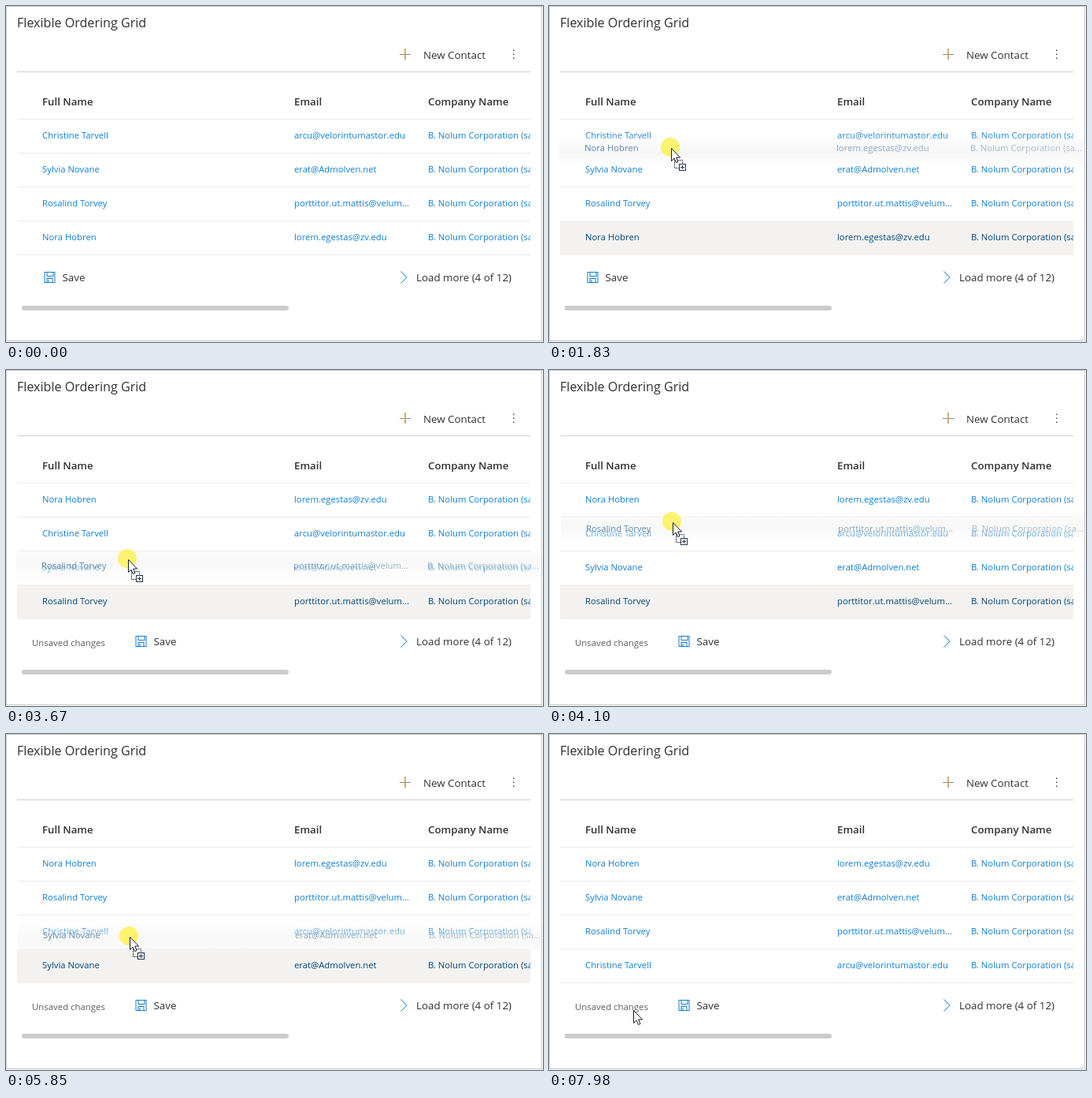
These frames come from a looping animation (682x426 px, 8000 ms). An HTML page with a canvas:

```html
<!DOCTYPE html>
<html lang="en">
<head>
<meta charset="utf-8">
<title>Flexible Ordering Grid</title>
<style>
  html, body { margin: 0; width: 100%; height: 100%; overflow: hidden; background: #fff; }
  canvas { display: block; width: 682px; height: 426px; }
</style>
</head>
<body>
<canvas id="stage"></canvas>
<script>
const W = 682, H = 426, LOOP = 8000;
const FONT = '"Open Sans", "Noto Sans", sans-serif';
const BLUE = '#0f7fd6', DARK_BLUE = '#004578', INK = '#323130';
const LEFT = 14, WIDTH = 652, ROW_TOP = 143, ROW_H = 43;
const COLS = [46, 366, 536];
const BODY = 11.3, LABEL = 13.35;
const COMPANY = 'B. Nolum Corporation (sa';

const people = [
  ['Christine Tarvell', 'arcu@velorintumastor.edu'],
  ['Sylvia Novane', 'erat@Admolven.net'],
  ['Rosalind Torvey', 'porttitor.ut.mattis@velum...'],
  ['Nora Hobren', 'lorem.egestas@zv.edu']
];

// The last row is dragged each time; dy is the ghost's offset from the pointer
const drags = [
  { press: 1490, drop: 2340, to: 0, dy: 0 },
  { press: 3530, drop: 4360, to: 1, dy: 7.5 },
  { press: 5640, drop: 6390, to: 1, dy: -2 }
];
const LAST = people.length - 1, GHOST_DELAY = 50;

const smooth = f => f * f * (3 - 2 * f);
const easeOut = f => 1 - (1 - f) ** 3;

const entry = { time: 130, x: 155, y: 390 };
const moves = [
  { start: 130, end: 1070, x: 155, y: 298, ease: easeOut },
  { start: 1490, end: 1970, x: 155, y: 150, ease: smooth },
  { start: 2440, end: 3200, x: 154, y: 286, ease: smooth },
  { start: 3530, end: 4230, x: 157, y: 192, ease: easeOut },
  { start: 4980, end: 5640, x: 156, y: 300, ease: smooth },
  { start: 5640, end: 6060, x: 157, y: 214, ease: smooth },
  { start: 6390, end: 6670, x: 157, y: 228, ease: f => f },
  { start: 6670, end: 7290, x: 50, y: 350, ease: smooth },
  { start: 7490, end: 7980, x: 107, y: 350, ease: smooth }
];

const canvas = document.getElementById('stage');
const ctx = canvas.getContext('2d');
const dpr = window.devicePixelRatio || 1;
canvas.width = W * dpr;
canvas.height = H * dpr;
ctx.scale(dpr, dpr);

function pointerAt(t) {
  if (t < entry.time) return null;
  let { x, y } = entry;
  for (const m of moves) {
    if (t < m.start) break;
    const f = m.ease(Math.min(1, (t - m.start) / (m.end - m.start)));
    x += (m.x - x) * f;
    y += (m.y - y) * f;
  }
  return { x: Math.round(x), y: Math.round(y) };
}

function orderAt(t) {
  const order = [...people];
  for (const d of drags) {
    if (t >= d.drop) order.splice(d.to, 0, order.pop());
  }
  return order;
}

function text(str, x, y, size, color, weight = 400) {
  ctx.font = `${weight} ${size}px ${FONT}`;
  ctx.fillStyle = color;
  ctx.fillText(str, x, y);
}

function rect(x, y, w, h, color) {
  ctx.fillStyle = color;
  ctx.fillRect(x, y, w, h);
}

function frame(x, y, w, h, color) {
  ctx.strokeStyle = color;
  ctx.lineWidth = 1;
  ctx.strokeRect(x + 0.5, y + 0.5, w, h);
}

function clipped(x, y, w, h, draw) {
  ctx.save();
  ctx.beginPath();
  ctx.rect(x, y, w, h);
  ctx.clip();
  draw();
  ctx.restore();
}

function drawCells(person, company, dx, baseline, color) {
  [...person, company].forEach((s, i) => text(s, COLS[i] + dx, baseline, BODY, color));
}

function drawPanel() {
  rect(0, 0, W, H, '#fff');
  frame(0, 0, 680, 424, '#c8c8c8');
  text('Flexible Ordering Grid', LEFT, 27, 16.1, INK);

  rect(500, 61, 14, 1, '#8a8886');
  rect(506, 54, 2, 14, '#d2ab6c');
  text('New Contact', 530, 67, LABEL, INK);
  for (let i = 0; i < 3; i++) rect(644, 55.5 + i * 5, 1.5, 1.5, '#484644');
  rect(LEFT, 83, WIDTH, 1, '#d2d0ce');

  ['Full Name', 'Email', 'Company Name'].forEach((s, i) => text(s, COLS[i], 126, 13.25, INK, 600));

  ctx.beginPath();
  ctx.roundRect(20, 380, 339, 6, 3);
  ctx.fillStyle = '#cbcbcb';
  ctx.fill();
}

function drawRows(order, hover) {
  clipped(LEFT, ROW_TOP, WIDTH, order.length * ROW_H + 2, () => {
    for (let i = 0; i <= order.length; i++) rect(LEFT, ROW_TOP + i * ROW_H, WIDTH, 1, '#edebe9');
    order.forEach((person, i) => {
      const y = ROW_TOP + i * ROW_H;
      if (i === hover) rect(LEFT, y, WIDTH, ROW_H + 1, '#f3f2f1');
      drawCells(person, COMPANY + 'mple)', 0, y + 25, i === hover ? DARK_BLUE : BLUE);
    });
  });
}

function drawSave(x) {
  frame(x, 337, 13, 13, BLUE);
  frame(x + 3, 337, 8, 5, BLUE);
  frame(x + 3, 345, 7, 5, BLUE);
  rect(x + 5, 347, 1, 3, BLUE);
  text('Save', x + 23, 349, LABEL, INK);
}

function drawFooter(dirty) {
  if (dirty) text('Unsaved changes', 33, 350, 11.4, '#605e5c');
  drawSave(dirty ? 164.5 : 48.5);
  ctx.beginPath();
  ctx.moveTo(501.5, 336.5);
  ctx.lineTo(509, 344);
  ctx.lineTo(501.5, 351.5);
  ctx.strokeStyle = BLUE;
  ctx.stroke();
  text('Load more (4 of 12)', 521, 349, LABEL, INK);
}

// Linear gradient whose opacity follows alpha(0..1)
function fade(x0, y0, x1, y1, rgb, alpha) {
  const g = ctx.createLinearGradient(x0, y0, x1, y1), steps = 8;
  for (let i = 0; i <= steps; i++) {
    const f = i / steps;
    g.addColorStop(f, `rgba(${rgb},${alpha(f)})`);
  }
  return g;
}

function drawGhost(person, p, dy) {
  const dx = p.x - 156, mid = p.y + dy, top = mid - ROW_H / 2;
  const band = fade(0, p.y - 22, 0, p.y + 30, '245,245,245', f => 0.7 * Math.sin(Math.PI * f) ** 2);
  const ink = fade(40, 0, 680, 0, '0,69,120', f => 0.65 - 0.35 * f);
  clipped(LEFT + dx, top, 680 - LEFT - dx, ROW_H, () => {
    rect(LEFT + dx, top, W, ROW_H, band);
    drawCells(person, COMPANY + '...', dx, mid + 4, ink);
  });
}

const arrow = new Path2D('M.5 .5V16.5L4 13L6.5 18.5L9 17.5L6.7 12H11.5Z');

function drawPointer({ x, y }, dragging) {
  const ink = '#23364d';
  ctx.save();
  ctx.translate(x, y);
  if (dragging) {
    ctx.setLineDash([2, 1]);
    frame(4, 15, 10, 10, ink);
    ctx.setLineDash([]);
    rect(10, 20, 9, 9, '#fff');
    frame(10, 20, 8, 8, ink);
    rect(12, 24, 5, 1, ink);
    rect(14, 22, 1, 5, ink);
  }
  ctx.fillStyle = '#fff';
  ctx.fill(arrow);
  ctx.strokeStyle = '#1b1b2b';
  ctx.stroke(arrow);
  ctx.restore();
}

function drawPress({ x, y }) {
  ctx.beginPath();
  ctx.arc(x - 1, y - 1, 12, 0, Math.PI * 2);
  ctx.fillStyle = 'rgba(255,240,65,0.75)';
  ctx.fill();
}

function render(t) {
  const p = pointerAt(t), order = orderAt(t);
  const drag = drags.find(d => t >= d.press && t < d.drop);
  const ghost = drag && t >= drag.press + GHOST_DELAY;
  const under = p ? Math.floor((p.y - ROW_TOP - 0.5) / ROW_H) : -1;

  drawPanel();
  drawRows(order, drag ? LAST : under);
  drawFooter(t >= drags[0].drop);
  if (ghost) drawGhost(order[LAST], p, drag.dy);
  if (drag) drawPress(p);
  if (p) drawPointer(p, ghost);
}

function tick() {
  render(performance.now() % LOOP);
  requestAnimationFrame(tick);
}
tick();
</script>
</body>
</html>
```
